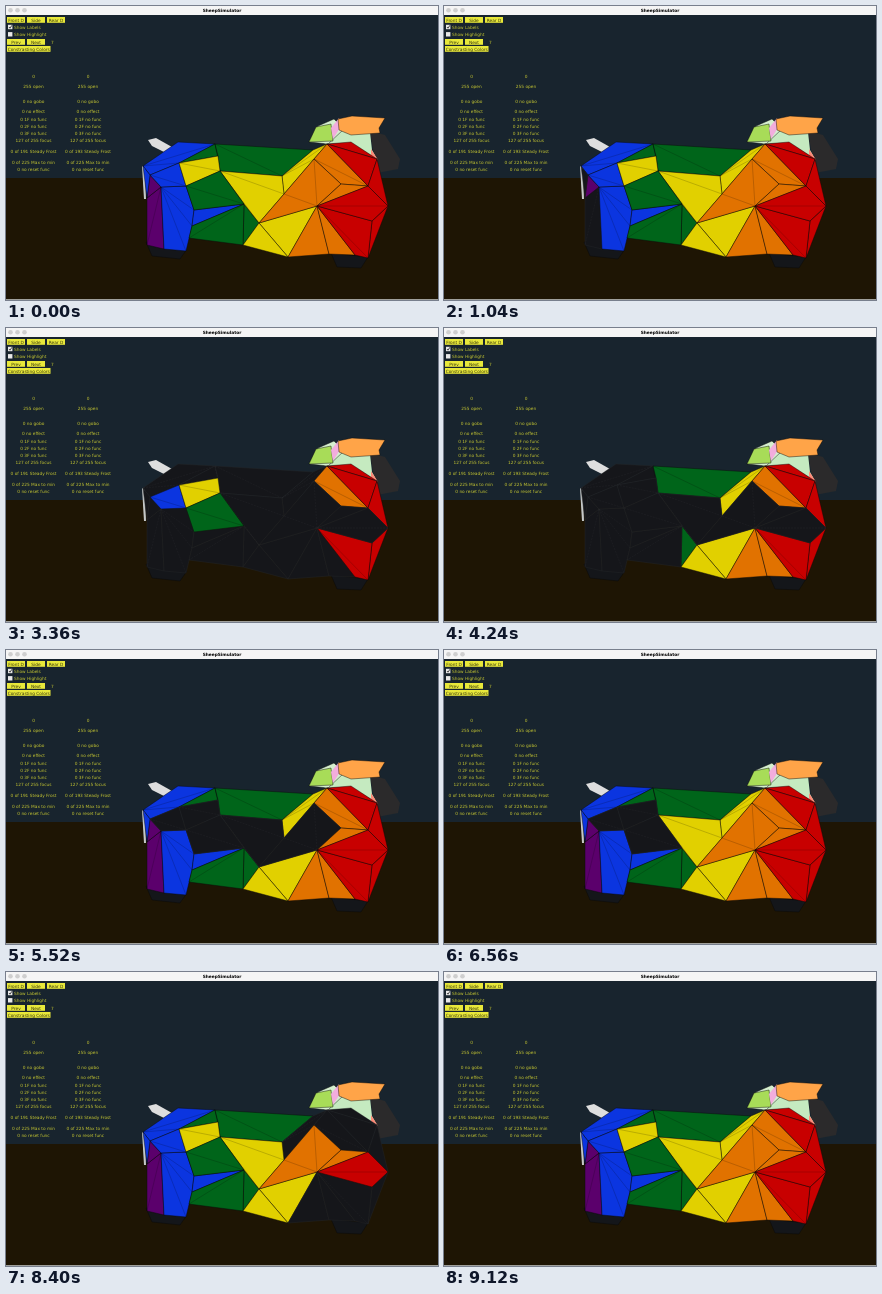
Animation of 432x294 px, one loop 9.2 s. Source, as an HTML page:

```html
<!DOCTYPE html>
<html lang="en">
<head>
<meta charset="utf-8">
<title>SheepSimulator</title>
<style>
html, body { margin: 0; width: 100%; height: 100%; overflow: hidden; background: #1e1504; }
svg { display: block; width: 100vw; height: 100vh; }
text { font: 4.3px "DejaVu Sans", sans-serif; fill: #c5c632; }
.mid { text-anchor: middle; }
.title { font-weight: bold; fill: #000; }
.ink { fill: #34340c; }
.edge { stroke: #0a0a0a; stroke-width: .45; stroke-linejoin: round; }
.crease { fill: none; stroke: #000; stroke-opacity: .5; stroke-width: .35; }
.dark { fill: #15161a; stroke: #24262a; }
.dark + .crease { stroke: #3a3c40; stroke-dasharray: 2 1; }
</style>
</head>
<body>
<svg id="stage" viewBox="0 0 432 294" preserveAspectRatio="none"></svg>
<script>
const LOOP = 9200, STEP = 80;
const stage = document.getElementById('stage');

function add(tag, attrs, content) {
  const node = document.createElementNS(stage.namespaceURI, tag);
  for (const key in attrs) node.setAttribute(key, attrs[key]);
  if (content !== undefined) node.textContent = content;
  return stage.appendChild(node);
}
const rect = (x, y, width, height, fill) => add('rect', { x, y, width, height, fill });
const poly = (points, fill, cls = '') => add('polygon', { points, fill, class: cls });
const label = (x, y, content, cls = '') => add('text', { x, y: y + 1.6, class: cls }, content);

// Window and scenery
rect(0, 0, 432, 172, '#18242e');
rect(0, 172, 432, 122, '#1e1504');
rect(0, 0, 432, 9, '#f5f5f5');
rect(0, 293, 432, 1, '#a0a09c');
for (let i = 0; i < 3; i++) add('circle', { cx: 4.5 + 7 * i, cy: 4.3, r: 2.3, fill: '#cfcfcf' });
label(216, 4.3, 'SheepSimulator', 'mid title');

// Controls
function buttons(y, width, ...captions) {
  captions.forEach((caption, i) => {
    const x = 1 + i * 20;
    rect(x, y, width, 5.8, '#e8e83a');
    label(x + width / 2, y + 2.9, caption, 'mid ink');
  });
}
buttons(11, 18, 'Front D', 'Side', 'Rear D');
buttons(33, 18, 'Prev', 'Next');
buttons(40, 43.5, 'Constrasting Colors');
label(45, 36, '7');
['Show Labels', 'Show Highlight'].forEach((caption, i) => {
  const y = 21 + 7.3 * i;
  rect(2, y - 2.2, 4.4, 4.4, '#e8e8e8');
  label(8, y, caption);
});
add('path', { d: 'M3 21l1 1.2 2-3', fill: 'none', stroke: '#222', 'stroke-width': .8 });

const readout = steady => [
  ['0'], ['255 open'], [''], ['0 no gobo'],
  ['0 no effect', '0 1F no func', '0 2F no func', '0 3F no func', '127 of 255 focus'],
  [`0 of ${steady} Steady Frost`], ['0 of 225 Max to min', '0 no reset func']];

function column(x, groups) {
  let y = 70;
  for (const lines of groups) {
    for (const line of lines) {
      label(x, y, line, 'mid');
      if (line) y += 7.25;
    }
    y += 3.5;
  }
}
column(27.5, readout(191));
column(82, readout(193));

// Tail, hooves and head
poly('142,134 150,132 166,141 158,146 146,140', '#dedede');
poly('136,160 139,162 140,193 138,193', '#c5c8c8');
poly('140,236 146,250 174,253 181,243', '#14161a', 'edge');
poly('325,247 331,261 355,262 362,251', '#14161a', 'edge');
poly('364,125 379,129 394,153 392,163 371,167', '#2b2a2b');
poly('318,138 333,124 364,126 366,144 371,153 345,137', '#c5eac0');
poly('365,143 372,154 365,150', '#ff8a78');
poly('303,136 312,120 328,113 338,123 322,138', '#d5efcf', 'edge');
poly('303,136 310,121 325,118 327,135', '#a8dc58', 'edge');
poly('325,122 333,112 334,122 327,133', '#f2addd');
poly('332,113 346,110 379,112 373,122 374,127 345,129 333,124', '#ffa448', 'edge');

// Body corners: outline clockwise in capitals, inner corners in small letters
const corners = {};
function place(first, list) {
  list.split(' ').forEach((pair, i) => {
    corners[String.fromCharCode(first.charCodeAt(0) + i)] = pair.split(',').map(Number);
  });
}
place('A', '137,160 172,136 209,138 307,144 321,138 345,136 371,153 382,200 362,252 349,249 323,248 282,251 237,239 183,232 180,245 158,243 141,239');
place('a', '144,169 173,157 212,150 214,165 276,170 278,188 308,153 335,178 362,180 366,215 311,200 253,217 238,198 188,204 186,220 180,180 155,181 141,192');

const palette = { blue: '#0b35e0', purple: '#5b006c', green: '#00651a',
  yellow: '#e1d000', orange: '#e17200', red: '#c80000' };

// Sweeps: time at the rear, time at the front, lit afterwards
const rings = {
  outer: {
    sweeps: [[960, 2680, false], [5150, 2800, true], [6580, 7880, false], [7460, 9040, true]],
    panels: { purple: 'qPQr aqr', blue: 'ABCba Aar qpnoOP nmo', green: 'Ccb CDedc mlM mMNo',
      yellow: 'eDEgf lkL lLM', orange: 'gEih kLK kKJ', red: 'EFG EGi GHi HIj kjIJ' }
  },
  inner: {
    sweeps: [[3800, 2280, false], [7300, 5000, true]],
    panels: { blue: 'abpq', yellow: 'bcdp deflm', green: 'pdmn', orange: 'klfgh hik', red: 'kiHj' }
  }
};

const mean = values => values.reduce((a, b) => a + b) / values.length;

// A panel switches when the slightly tilted front of a sweep reaches its centre
function panel(name, color, sweeps) {
  const points = [...name].map(key => corners[key]);
  const x = mean(points.map(p => p[0])), y = mean(points.map(p => p[1]));
  const along = (x - 0.15 * (y - 200) - 137) / 245;
  const node = poly(points.join(' '), color, 'edge');
  const fan = points.slice(2, -1).map(p => `M${points[0]}L${p}`).join('');
  add('path', { class: 'crease', d: fan });
  const switches = sweeps.map(([rear, front, lit]) => ({ at: rear + (front - rear) * along, lit }));
  return { node, switches };
}

const lamps = [];
for (const { sweeps, panels } of Object.values(rings))
  for (const color in panels)
    for (const name of panels[color].split(' '))
      lamps.push(panel(name, palette[color], sweeps));

function draw() {
  const t = Math.floor(performance.now() % LOOP / STEP) * STEP;
  for (const { node, switches } of lamps) {
    const last = switches.filter(s => t >= s.at).pop();
    node.classList.toggle('dark', !!last && !last.lit);
  }
  requestAnimationFrame(draw);
}
draw();
</script>
</body>
</html>
```
